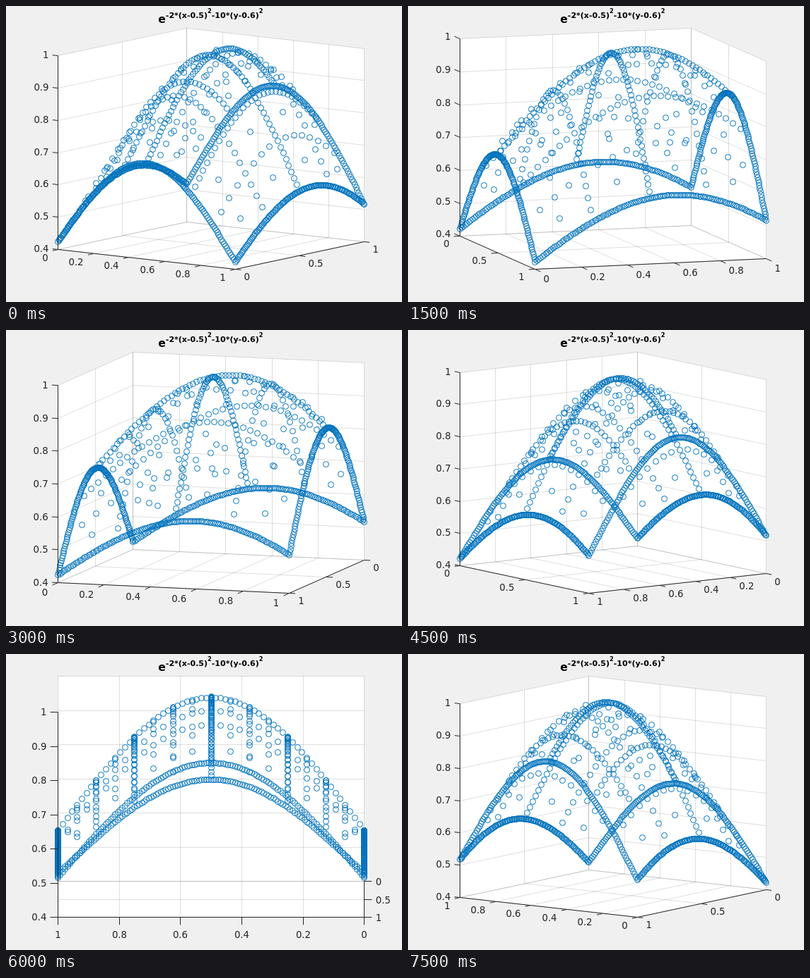
Recreate the animation shown at these times as an HTML page. Size 560 px wide and 420 px high, loop 8000 ms.

```html
<!DOCTYPE html>
<html lang="en">
<head>
<meta charset="utf-8">
<title>Rotating sparse grid surface</title>
<style>
  html, body { margin: 0; width: 100%; height: 100%; overflow: hidden; background: #f0f0f0; }
  svg { display: block; width: 560px; height: 420px; font-family: "DejaVu Sans", sans-serif; }
  .wall { fill: #fff; }
  .grid path { fill: none; stroke: #262626; stroke-opacity: .15; }
  .axis { fill: none; stroke: #262626; }
  .label { fill: #262626; font-size: 13.33px; }
  .marks { fill: none; stroke: #0072bd; }
  .title { font-weight: bold; font-size: 15.5px; text-anchor: middle; }
  .sup { font-size: 11px; }
  .supsup { font-size: 8.25px; }
</style>
</head>
<body>
<svg viewBox="0 0 560 420">
  <g id="plot"></g>
  <text class="title" x="289.4" y="23.8">e<tspan class="sup" dy="-6.8">-2*(x-0.5)</tspan><tspan class="supsup" dy="-7">2</tspan><tspan class="sup" dy="7">-10*(y-0.6)</tspan><tspan class="supsup" dy="-7">2</tspan></text>
</svg>
<script>
const LOOP = 8000, HOLD = 1500, STEP_DEG = 36, ELEVATION = 10;
const BOX = { left: 73.6, top: 31.55, width: 433.2, height: 342.3 };
const LEVEL = 7, Z_MIN = 0.4, Z_MAX = 1;
const plot = document.getElementById('plot');

const rad = deg => deg * Math.PI / 180;
const fmt = p => p.map(v => v.toFixed(2)).join(' ');
const range = (n, f) => Array.from({ length: n }, (_, i) => f(i));

// Nodes that a hierarchical level adds on [0, 1]
const nodes = level => level === 0 ? [0, 1]
  : range(2 ** (level - 1), i => (2 * i + 1) / 2 ** level);

const height = (x, y) =>
  (Math.exp(-2 * (x - 0.5) ** 2 - (y - 0.6) ** 2) - Z_MIN) / (Z_MAX - Z_MIN);

const points = [];
for (let i = 0; i <= LEVEL; i++)
  for (let j = 0; i + j <= LEVEL; j++)
    for (const x of nodes(i))
      for (const y of nodes(j)) points.push([x, y, height(x, y)]);

// Orthographic view of the unit cube, stretched to fill BOX, on pixel centres
function camera(azimuth) {
  const c = Math.cos(rad(azimuth)), s = Math.sin(rad(azimuth));
  const se = Math.sin(rad(ELEVATION)), ce = Math.cos(rad(ELEVATION));
  const span = Math.abs(c) + Math.abs(s);
  const uMin = Math.min(0, c) + Math.min(0, s);
  const vMin = se * (Math.min(0, s) + Math.min(0, -c)) - ce;
  const kx = BOX.width / span, ky = BOX.height / (se * span + ce);
  const project = ([x, y, z]) => [
    BOX.left + kx * (x * c + y * s - uMin),
    BOX.top + ky * (se * (x * s - y * c) - ce * z - vMin)
  ].map(v => Math.floor(v) + 0.5);
  return { c, s, project, tick: 0.025 * kx };
}

function render(azimuth) {
  const { c, s, project, tick } = camera(azimuth);
  const flat = Math.abs(s) < 1e-9;
  const fx = s > 1e-9 ? 1 : 0, fy = c < 0 ? 1 : 0;
  const bx = 1 - fx, by = 1 - fy;
  const front = [fx, fy, 0];
  const [left, right] = [[bx, fy, 0], [fx, by, 0]]
    .sort((a, b) => project(a)[0] - project(b)[0]);

  const line = (...pts) => 'M' + pts.map(p => fmt(project(p))).join('L');
  const face = (...pts) => `<path class="wall" d="${line(...pts)}Z"/>`;
  const stops = fine => fine ? range(6, i => i / 5) : [0, 0.5, 1];
  const xs = stops(Math.abs(c) > Math.abs(s)), ys = stops(Math.abs(c) <= Math.abs(s));
  const zs = range(7, i => i / 6);

  const walls = face([0, 0, 0], [1, 0, 0], [1, 1, 0], [0, 1, 0])
    + face([0, by, 0], [1, by, 0], [1, by, 1], [0, by, 1])
    + face([bx, 0, 0], [bx, 1, 0], [bx, 1, 1], [bx, 0, 1]);

  const grid = [];
  for (const x of xs)
    grid.push(line([x, 0, 0], [x, 1, 0]), line([x, by, 0], [x, by, 1]));
  for (const y of ys) {
    grid.push(line([0, y, 0], [1, y, 0]));
    if (!flat) grid.push(line([bx, y, 0], [bx, y, 1]));
  }
  for (const z of zs) {
    grid.push(line([0, by, z], [1, by, z]));
    if (!flat) grid.push(line([bx, 0, z], [bx, 1, z]));
  }

  // Tick vector: screen direction from one corner to another, fixed length
  const outward = (from, to) => {
    const a = project(from), b = project(to);
    const dx = b[0] - a[0], dy = b[1] - a[1], k = tick / Math.hypot(dx, dy);
    return [dx * k, dy * k];
  };
  let axes = line(left, front, right) + line(left, [left[0], left[1], 1]);
  let labels = '';
  const addTick = (at, dir, value, anchor, dx, dy) => {
    const p = project(at), end = [p[0] + dir[0], p[1] + dir[1]];
    axes += `M${fmt(p)}L${fmt(end)}`;
    const [tx, ty] = [end[0] + dx, end[1] + dy + 4.8];
    labels += `<text x="${tx.toFixed(2)}" y="${ty.toFixed(2)}" text-anchor="${anchor}">${+value.toFixed(1)}</text>`;
  };

  const zDir = outward(front, left);
  for (const z of zs)
    addTick([left[0], left[1], z], zDir, Z_MIN + z * (Z_MAX - Z_MIN), 'end', -5.2, 0);

  const floorAxis = (corner, dir, place) => {
    const alongX = corner[0] !== fx;
    for (const v of alongX ? xs : ys)
      addTick(alongX ? [v, fy, 0] : [fx, v, 0], dir, v, ...place);
  };
  floorAxis(left, outward(right, front), flat ? ['middle', 0, 13.5] : ['end', -6.3, 10]);
  floorAxis(right, outward(left, front), flat ? ['start', 5.4, 0.4] : ['start', 4.2, 10]);

  const marks = points.map(p => {
    const [x, y] = project(p);
    return `<circle cx="${x}" cy="${y}" r="4"/>`;
  }).join('');

  // The axis lines lie nearest to the viewer, so they cover the marks
  plot.innerHTML = walls
    + `<g class="grid">${grid.map(d => `<path d="${d}"/>`).join('')}</g>`
    + `<g class="marks">${marks}</g>`
    + `<path class="axis" d="${axes}"/><g class="label">${labels}</g>`;
}

const start = performance.now();
let shown = -1;
function tickFrame() {
  const step = Math.floor(((performance.now() - start) % LOOP) / HOLD);
  if (step !== shown) {
    shown = step;
    render(STEP_DEG * (step + 1));
  }
  requestAnimationFrame(tickFrame);
}
tickFrame();
</script>
</body>
</html>
```
